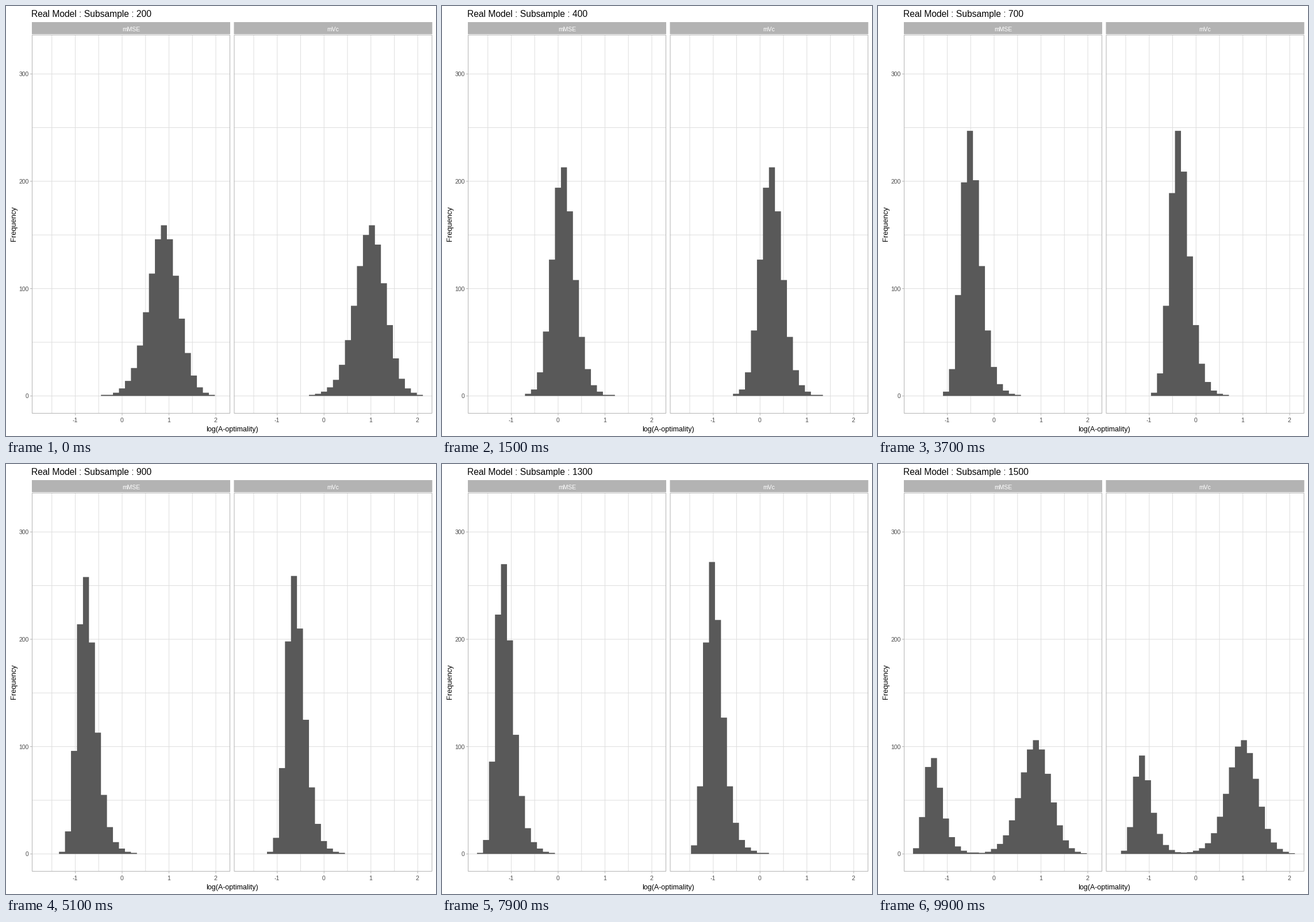
A matplotlib script that plays this animation: 748x748 px, repeating every 10000 ms.

```python
import math
import numpy as np
import matplotlib.pyplot as plt
from matplotlib.animation import FuncAnimation
from matplotlib.patches import Rectangle

SIZE, DPI = 748, 88
PX = 72 / DPI            # points per pixel
BINS, BIN_W = 30, 10.43
UNIT_X, UNIT_Y, BASE = 40.75, 1.867, 678.3
LIGHT, GREY, BAR, TEXT = "#dedede", "#b3b3b3", "#595959", "#4d4d4d"
SIZES = range(200, 1501, 100)

Z = np.linspace(-4.5, 4.5, 2001)
PHI = np.array([0.5 * (1 + math.erf(z / math.sqrt(2))) for z in Z])


def histogram(n, median):
    """Counts of 1000 draws from a skewed bell that narrows as n grows."""
    t = math.log(n / 200)
    left = 1.13 + 1.43 * math.exp(-1.15 * t)
    right = 1.66 + 0.76 * math.exp(-1.6 * t)
    skew = math.log(right / left)
    scale = skew * left * right / (right - left)
    tails = np.exp(0.015 * Z ** 2)
    x = median(t) + scale * np.expm1(skew * Z) / skew * tails
    return np.round(1000 * np.diff(np.interp(np.arange(BINS + 1), x, PHI)))


def series(median):
    return [histogram(n, median) for n in SIZES]


def build_timeline():
    """One (state, share of next state, titled state) per frame."""
    steps = []
    for i in range(len(SIZES)):
        steps += [(i, 0, i)] * 4
        n = 4 if i < 3 else 3
        for s in range(1, n + 1):
            steps.append((i, s / n, i if s <= math.ceil(n / 2) else i + 1))
    return steps[:100]


TIMELINE = build_timeline()

plt.rcParams.update({"font.family": "Liberation Sans",
                     "text.kerning_factor": 6, "path.snap": False})
fig = plt.figure(figsize=(SIZE / DPI, SIZE / DPI), dpi=DPI, facecolor="white")
ax = fig.add_axes([0, 0, 1, 1])
ax.set_xlim(0, SIZE)
ax.set_ylim(SIZE, 0)
ax.axis("off")


def line(x, y, color):
    ax.plot(x, y, color=color, lw=PX, solid_capstyle="butt", zorder=1)


def label(x, y, s, px, color="black", ha="center", **kw):
    return ax.text(x, y, s, fontsize=px * PX, color=color, ha=ha, **kw)


def panel(left, zero, start, name):
    width = 345
    ax.add_patch(Rectangle((left, 28), width, 21, fc=GREY, lw=0))
    label(left + width / 2, 44.3, name, 10.4, "white")
    for k in range(7):
        y = BASE - 50 * k * UNIT_Y
        line([left, left + width], [y, y], LIGHT)
    for k in range(-3, 5):
        x = zero + k * UNIT_X
        line([x, x], [51, 708], LIGHT)
        if k % 2 == 0:
            line([x, x], [709, 712], GREY)
            label(x - 0.5, 723.6, str(k // 2), 10.4, TEXT)
    ax.add_patch(Rectangle((left + 0.5, 50.5), width - 1, 658,
                           fill=False, ec=GREY, lw=PX, zorder=4))
    edges = start + BIN_W * np.arange(BINS + 1)
    return ax.stairs(np.full(BINS, BASE), edges, baseline=BASE, fill=True,
                     color=BAR, lw=0, zorder=3)


PANELS = [
    (panel(45, 202, 60.9, "mMSE"),
     series(lambda t: 20.39 - 8.75 * t + 0.18 * t * t)),
    (panel(396.5, 553.25, 412.3, "mVc"),
     series(lambda t: 21.21 - 8.47 * t + 0.14 * t * t)),
]
# stairs() may adjust the limits
ax.set_xlim(0, SIZE)
ax.set_ylim(SIZE, 0)

for count in range(0, 301, 100):
    y = BASE - count * UNIT_Y
    line([42, 45], [y, y], GREY)
    label(39.5, y + 4.2, str(count), 10.4, TEXT, ha="right")
label(393.5, 740, "log(A-optimality)", 12.5)
label(20, 379, "Frequency", 12.9, ha="right", va="center", rotation=90)
title = label(44.5, 18.5, "", 15.6, ha="left")


def draw(frame):
    i, share, titled = TIMELINE[frame]
    nxt = (i + 1) % len(SIZES)
    for bars, data in PANELS:
        counts = (1 - share) * data[i] + share * data[nxt]
        bars.set_data(BASE - counts * UNIT_Y)
    title.set_text(f"Real Model : Subsample : {SIZES[titled]}")
    return []


anim = FuncAnimation(fig, draw, frames=len(TIMELINE), interval=100,
                     init_func=lambda: draw(0), repeat=True, repeat_delay=0)
plt.show()
```
